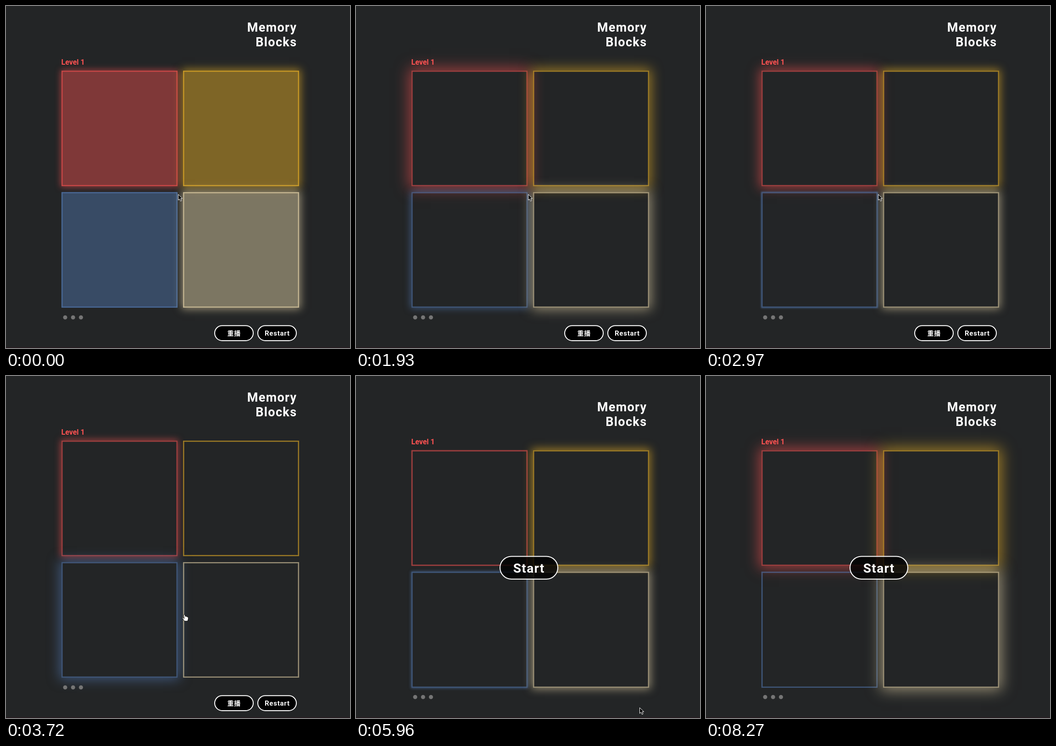
These frames come from a looping animation (750x746 px, 8.37 s). An HTML page:

```html
<!DOCTYPE html>
<html lang="zh-Hant">
<head>
<meta charset="utf-8">
<title>Memory Blocks</title>
<style>
  html, body { margin: 0; width: 100%; height: 100%; overflow: hidden; background: #232526; }
  #stage { position: relative; width: 750px; height: 746px; overflow: hidden; }
  #game { position: absolute; inset: 0; }
  .block { position: absolute; width: 253px; height: 252.5px; }
  svg { position: absolute; left: 0; top: 0; overflow: visible; }
  text { font-family: Roboto, "Noto Sans CJK TC", "Noto Sans CJK", sans-serif; font-weight: 700; fill: #fff; letter-spacing: .05em; }
  .title { font-size: 27px; text-anchor: end; }
  .level { font-size: 16px; fill: #ff5252; letter-spacing: 0; }
  .label { font-size: 15px; text-anchor: middle; }
  .pill { stroke: #fff; stroke-width: 2; }
</style>
</head>
<body>
<div id="stage">
  <div id="game">
    <svg width="750" height="746">
      <text class="title" x="634.4" y="56">Memory</text>
      <text class="title" x="634.4" y="88.3">Blocks</text>
      <text class="level" x="120.5" y="127.5">Level 1</text>
      <g fill="#757575">
        <circle cx="129" cy="679.3" r="4.5"/>
        <circle cx="146.2" cy="679.3" r="4.5"/>
        <circle cx="163.4" cy="679.3" r="4.5"/>
      </g>
      <g id="buttons">
        <rect class="pill" x="455" y="697.3" width="84" height="32.6" rx="16.3"/>
        <text class="label" x="497.3" y="719" style="font-size:14px">重播</text>
        <rect class="pill" id="restart" x="549" y="697.3" width="84" height="32.6" rx="16.3"/>
        <text class="label" x="591.4" y="719">Restart</text>
      </g>
    </svg>
  </div>
  <svg width="750" height="746">
    <rect y="744.5" width="750" height="1.5" fill="#2a1a20"/>
    <g id="start">
      <rect class="pill" x="314" y="393.5" width="126" height="49.5" rx="24.75" fill="#000" fill-opacity=".82"/>
      <text x="377.2" y="428.5" text-anchor="middle" style="font-size:28px">Start</text>
    </g>
    <path id="arrow" d="M0 0V12.5L3 9.8L5 14.6L7.4 13.6L5.4 8.9H9.2Z" fill="#000" stroke="#fff"/>
    <path id="hand" d="M-1.6 .8C-1-.4.6-.2 1 1L2 4.4C3 3.6 4.2 4 4.5 5C5.5 4.4 6.5 5 6.7 6C7.8 5.7 8.5 6.5 8.5 7.7L8 11.5L6.8 14.8H.2L-2.2 11.2L-4.6 8.2C-4.6 6.8-3 6.6-2 7.8L-.6 9Z" fill="#fff" stroke="#000"/>
  </svg>
</div>
<script>
const LOOP = 8370, RESTART = 5810, NOTE = 2230, FADE = 750, LIT = .42;
const $ = id => document.getElementById(id);
const game = $('game');

// Each glow swings between none and full; peak and period are in ms.
const blocks = [
  { x: 120.7, y: 140.7, rgb: '255,82,82', peak: 1900, period: 7000 },
  { x: 385.8, y: 140.7, rgb: '252,189,38', peak: 2320, period: 3000 },
  { x: 120.7, y: 405.9, rgb: '86,126,188', peak: 1200, period: 2900, note: NOTE },
  { x: 385.8, y: 405.9, rgb: '247,228,181', peak: 2320, period: 3000 }
];
for (const b of blocks) {
  b.el = document.createElement('div');
  b.el.className = 'block';
  b.el.style.left = b.x + 'px';
  b.el.style.top = b.y + 'px';
  game.insertBefore(b.el, game.lastElementChild);
}

// Pointer stops: time, x, y
const path = [
  [3200, 375.5, 411], [3620, 389, 520], [3780, 389, 520],
  [4170, 585, 689], [4620, 618.5, 725], [5500, 618.5, 725],
  [5810, 618.5, 723.5], [7000, 618.5, 723.5], [7400, 622, 765]
];

const fade = age => age < 0 ? 0 : LIT * Math.max(0, 1 - age / FADE);
const show = (el, on) => el.style.display = on ? '' : 'none';

function pointer(t) {
  const i = path.findIndex(p => p[0] > t);
  if (i === 0) return path[0].slice(1);
  if (i < 0) return path[path.length - 1].slice(1);
  const [t0, x0, y0] = path[i - 1], [t1, x1, y1] = path[i];
  const k = (t - t0) / (t1 - t0), e = k * k * (3 - 2 * k);
  return [x0 + (x1 - x0) * e, y0 + (y1 - y0) * e];
}

function draw(t) {
  for (const b of blocks) {
    const glow = (1 + Math.cos(2 * Math.PI * (t - b.peak) / b.period)) / 2;
    const light = fade(t) + (b.note ? fade(t - b.note) : 0);
    const color = `rgba(${b.rgb},.55)`;
    b.el.style.background = `rgba(${b.rgb},${light})`;
    b.el.style.boxShadow =
      `inset 0 0 0 2.5px ${color}, 0 0 ${30 * glow}px ${5 * glow}px ${color}`;
  }

  const menu = t >= RESTART;
  game.style.top = menu ? '21.3px' : '0';
  show($('buttons'), !menu);
  show($('start'), menu);

  const [x, y] = pointer(t);
  const onBlock = !menu && x > 386 && y < 658;
  const onRestart = !menu && x > 549 && y > 697;
  const hand = onBlock || onRestart;
  $('restart').style.fill = onRestart ? '#18191a' : '#000';
  show($('hand'), hand);
  show($('arrow'), !hand);
  $(hand ? 'hand' : 'arrow').setAttribute('transform', `translate(${x} ${y})`);
}

const begin = performance.now();
function tick() {
  draw((performance.now() - begin) % LOOP);
  requestAnimationFrame(tick);
}
tick();
</script>
</body>
</html>
```
